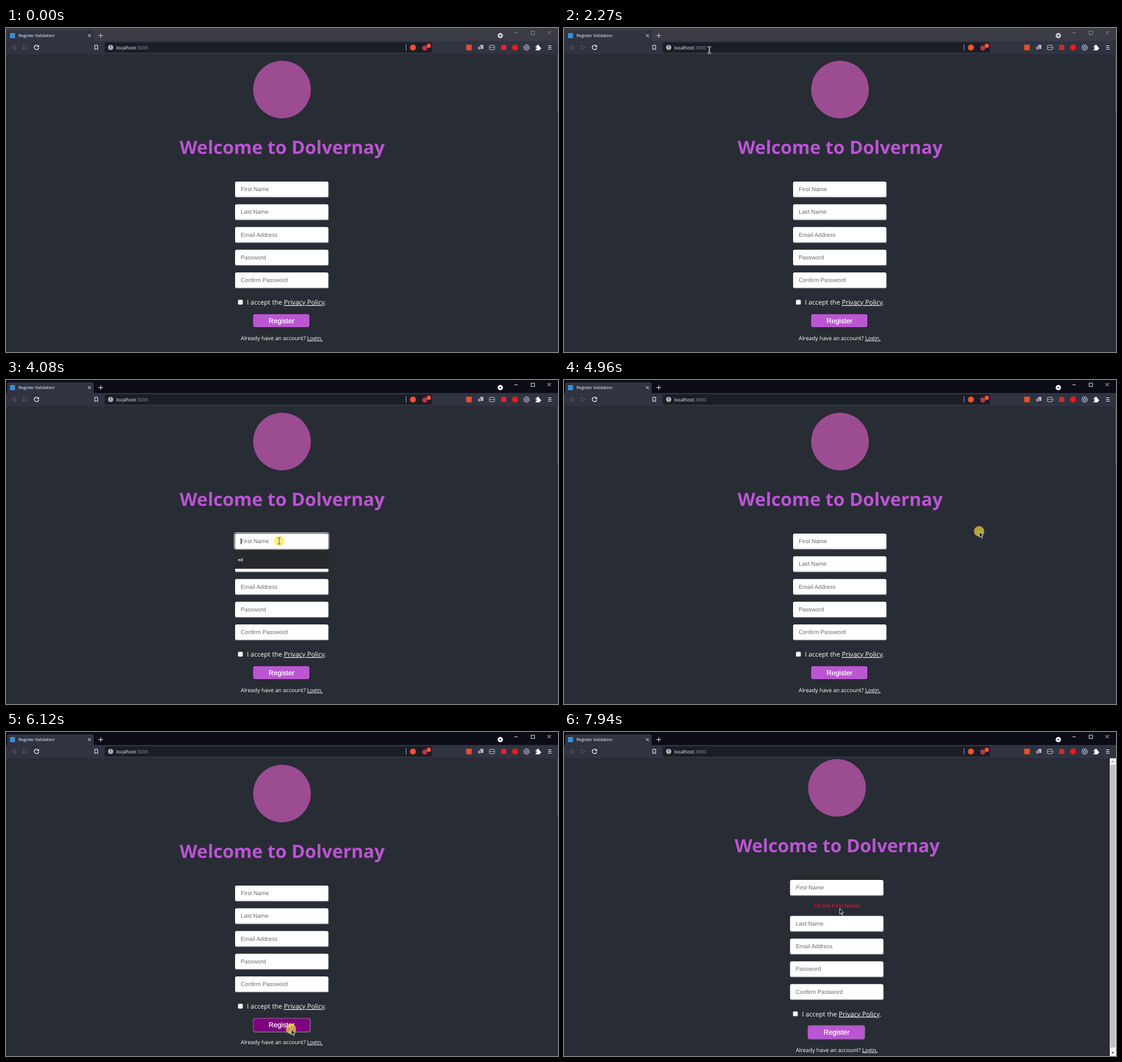
Animation of 976x574 px, one loop 8 s. Source, as an HTML page:

```html
<!DOCTYPE html>
<html lang="en">
<head>
<meta charset="utf-8">
<title>Register Validation</title>
<style>
html, body { margin: 0; width: 100%; height: 100%; overflow: hidden; background: #282c34; }
svg { display: block; width: 100%; height: 100%; }
text { font-family: "Open Sans", "Noto Sans", sans-serif; fill: #fff; text-rendering: geometricPrecision; white-space: pre; }
.arial { font-family: "Liberation Sans", Arial, sans-serif; }
.hint { font-size: 10.2px; fill: #6c6c6c; }
.medium { font-weight: 500; }
.line { fill: none; stroke: #fff; }
.dim { stroke: #62656f; }
.link { text-decoration: underline 1px; text-underline-offset: 1px; }
</style>
</head>
<body>
<svg viewBox="0 0 976 574">
  <rect width="976" height="574" fill="#282c34"/>
  <rect x="975" y="46" width="1" height="103" fill="#555960"/>

  <g id="upper">
    <circle cx="488" cy="109" r="51" fill="#9c4c91"/>
    <text x="307" y="223" font-size="32.3" font-weight="700" style="fill:#ba55d3">Welcome to Dolvernay</text>
    <rect id="focus" x="403.5" y="270.5" width="167.5" height="29.5" rx="3" fill="#15171b" stroke="#fff"/>
    <g id="firstField"></g>
    <path id="caret" d="M415.5 280V291" stroke="#111"/>
  </g>

  <text id="error" class="arial" x="441.3" y="311.3" font-size="10.1" style="fill:#e0163c">Fill the First Name</text>

  <g id="lower">
    <g id="fields"></g>
    <rect x="410.2" y="481.6" width="8.5" height="8.5" rx="1.5" fill="#fff" stroke="#767676" stroke-width=".4"/>
    <text x="426" y="490" font-size="11.6">I accept the <tspan class="link">Privacy Policy</tspan>.</text>
    <g id="button">
      <rect id="edge" x="436" y="506" width="101.7" height="25.2" rx="4"/>
      <rect id="face" x="436.7" y="506.7" width="100" height="23.5" rx="3.5"/>
    </g>
    <text class="arial" x="464.3" y="522.8" font-size="12.3" stroke="#fff" stroke-width=".25">Register</text>
    <text x="415" y="553" font-size="9.74">Already have an account? <tspan class="link">Login.</tspan></text>
  </g>

  <g id="list">
    <rect x="403.5" y="301.5" width="167.5" height="33" fill="#28292c"/>
    <text x="410" y="321" font-size="7.5" font-weight="600">ed</text>
  </g>

  <g id="scrollbar">
    <rect x="965" y="46" width="11" height="528" fill="#f1f1f1"/>
    <rect x="966" y="58" width="9" height="501" fill="#c1c1c1"/>
    <path d="M968 53.5l2.5-3 2.5 3z" fill="#a3a3a3"/>
    <path d="M968 567l2.5 3 2.5-3z" fill="#505050"/>
  </g>

  <!-- browser bars -->
  <rect id="titlebar" width="976" height="24"/>
  <path d="M2 24V7Q2 4 5 4H152Q155 4 155 7V24Z" fill="#2f3342"/>
  <rect y="23" width="976" height="23.5" fill="#2f3342"/>
  <rect x="7" y="9" width="9" height="9" fill="#3b8fd0"/>
  <text class="medium" x="22" y="16" font-size="7.4">Register Validation</text>
  <path class="line" d="M145 11l5 5m0-5l-5 5"/>
  <path id="newTab" class="line" d="M163.5 13.5h8m-4-4v8"/>
  <circle id="menu" cx="874" cy="13.5" r="4.7" fill="#fff"/>
  <path d="M871.8 12.4h4.4l-2.2 2.8z" fill="#15161f"/>
  <path id="controls" class="line" d="M899 8.5h6M928.5 5.5h6v6h-6zM957.5 5l6 6m0-6l-6 6" stroke-width=".9"/>

  <path class="line dim" d="M17 30.5v8l-6.5-4zM30.5 30.5v8l6.5-4z"/>
  <path class="line" d="M57 31.6A4 4 0 1 0 58 35" stroke-width="1.3"/>
  <path d="M58.3 30v3.8h-3.8z" fill="#fff"/>
  <path class="line" d="M157 30.5h5v8l-2.5-2-2.5 2z"/>

  <rect id="urlBar" x="174.5" y="25.5" width="578.5" height="18" rx="2.5" fill="#1b1d26"/>
  <circle cx="185" cy="34.5" r="4.6" fill="#b9bbc0"/>
  <path d="M185 31.5v3.6m0 1v1.4" stroke="#1b1d26" stroke-width="1.2"/>
  <rect id="selection" x="195" y="28.5" width="57.5" height="12.5" fill="#1668c8"/>
  <text class="medium" x="195" y="37.5" font-size="8.35">localhost<tspan id="port">:3000</tspan></text>
  <path d="M707.5 29v11" stroke="#a9abb2"/>
  <circle cx="719.5" cy="34.5" r="5.3" fill="#f5552f"/>
  <circle cx="740.5" cy="35.5" r="4.5" fill="#b53a45"/>
  <circle cx="747.5" cy="31.5" r="4" fill="#e8412c"/>
  <text x="746" y="34" font-size="6.5">1</text>

  <rect x="813.5" y="29.5" width="10" height="10" fill="#ec4b2b"/>
  <path d="M838 30h6v7h-6z" fill="#b9bbc1"/>
  <path d="M834.5 32.5h5v6h-5z" fill="#8d9099" stroke="#2f3342" stroke-width=".6"/>
  <g class="line" opacity=".75">
    <rect x="854.5" y="30.5" width="9.5" height="8" rx="2"/>
    <path d="M856 34.5h2.5m2 0h2" stroke-width="1.5"/>
  </g>
  <rect x="875.5" y="30" width="9" height="9" fill="#d9282f"/>
  <circle cx="900" cy="34.5" r="5.2" fill="#ee1c1c"/>
  <g class="line"><circle cx="920.5" cy="34.5" r="4.7"/><circle cx="920.5" cy="34.5" r="2"/></g>
  <path d="M936.5 32h2.5a1.7 1.7 0 1 1 3 0h2v2.5a1.6 1.6 0 1 1 0 3v2h-7.5v-2.5a1.5 1.5 0 1 0 0-2.8z" fill="#fff"/>
  <path class="line" d="M958.5 31.5h6m-6 3h6m-6 3h6"/>

  <circle id="press" r="9.2" fill="#ffe632" opacity=".65"/>
  <g id="pointer">
    <path id="arrow" d="M.5 .5V10.5L2.8 8.5 4.4 12.3 6 11.6 4.4 8H7.3Z" fill="#14151a" stroke="#fff" stroke-width=".8"/>
    <g id="beam" fill="none">
      <path d="M-3-5.5H3M0-5.5V5.5M-3 5.5H3" stroke="#fff" stroke-width="2.2"/>
      <path d="M-2.5-5.5H2.5M0-5.5V5.5M-2.5 5.5H2.5" stroke="#26282e" stroke-width=".9"/>
    </g>
  </g>
</svg>
<script>
const LOOP = 8000, ACTIVATE = 2340, FOCUS = 3960, BLUR = 4840, SUBMIT = 6250;
const PITCH = 40.25;

// pointer stops: time, x, y
const route = [
  [170, 780, 527], [560, 53, 139], [590, 53, 139],
  [860, 23, 13], [1060, 36, 13], [1260, 36, 13], [1340, 27, 1], [1800, 235, 43], [2000, 257, 39],
  [2660, 257, 39], [2740, 273, 54], [3340, 560, 226], [3540, 560, 226],
  [3880, 483, 285], [4620, 483, 285], [4780, 734, 268], [4970, 734, 268],
  [5160, 599, 375], [5370, 500, 488], [5440, 500, 488], [6000, 504, 526], [6450, 504, 526],
  [6650, 535, 455], [7000, 490, 299], [7200, 447, 306], [7260, 447, 306],
  [7460, 487, 323], [7939, 487, 323], [7940, 487, 312], [LOOP, 487, 312]
];
const presses = [[ACTIVATE, 2480], [FOCUS, 4140], [BLUR, 4970], [6060, SUBMIT]];

const el = id => document.getElementById(id);
const show = (id, on) => el(id).style.display = on ? "" : "none";
const set = (id, name, value) => el(id).setAttribute(name, value);
const move = (id, x, y) => set(id, "transform", `translate(${x} ${y})`);
const within = (t, a, b) => t >= a && t < b;
const inBox = ([x, y], l, t, r, b) => x >= l && x <= r && y >= t && y <= b;

function field(label, i) {
  const y = 272 + i * PITCH;
  const box = (dx, dy, w, h, fill) =>
    `<rect x="${405 + dx}" y="${y + dy}" width="${w}" height="${h}" rx="2.5" fill="${fill}"/>`;
  return box(-.8, -.8, 166, 28.5, "#1b1d21") + box(0, 1, 165.7, 27.5, "#77787c") + box(0, 0, 164.7, 27.2, "#fff") +
    `<text class="arial hint" x="415" y="${y + 17}">${label}</text>`;
}
const [first, ...others] = ["First Name", "Last Name", "Email Address", "Password", "Confirm Password"].map(field);
el("firstField").innerHTML = first;
el("fields").innerHTML = others.join("");

function pointerAt(t) {
  const i = route.findIndex(stop => stop[0] > t);
  if (i < 1) return [route[0][1], route[0][2]];
  const [t0, x0, y0] = route[i - 1], [t1, x1, y1] = route[i];
  const k = (t - t0) / (t1 - t0);
  return [x0 + (x1 - x0) * k, y0 + (y1 - y0) * k];
}

function overField(p, dx, dy, sent) {
  for (let i = 0; i < 5; i++) {
    const y = 272 + i * PITCH + (i ? dy : sent ? -10 : 0);
    if (inBox(p, 405 + dx, y, 570 + dx, y + 28)) return true;
  }
  return inBox(p, 190, 26, 704, 44);
}

function draw(t) {
  const active = t >= ACTIVATE, sent = t >= SUBMIT;
  const dx = sent ? -5.3 : 0, dy = sent ? 13.5 : 0;
  const p = pointerAt(t);

  set("titlebar", "fill", active ? "#0b0c15" : "#3b3c44");
  for (const id of ["newTab", "menu"]) set(id, "opacity", active ? 1 : .75);
  set("controls", "opacity", active ? 1 : .45);
  const editing = within(t, ACTIVATE, FOCUS);
  set("urlBar", "stroke", editing ? "#a8402f" : "none");
  show("selection", editing);
  el("port").style.fill = editing ? "#fff" : "#969aa5";

  move("upper", dx, sent ? -10 : 0);
  move("lower", dx, dy);
  const focused = within(t, FOCUS, BLUR);
  show("focus", focused);
  show("caret", focused);
  show("list", within(t, FOCUS + 60, BLUR));
  show("error", sent);
  show("scrollbar", sent);

  const hover = inBox(p, 436 + dx, 507 + dy, 537 + dx, 531 + dy);
  const down = within(t, ...presses[3]);
  set("face", "fill", hover ? "#800080" : "#ba55d3");
  set("edge", "fill", down ? "#96949a" : sent ? "#6a6a70" : "#0c0c10");
  move("button", down ? .8 : 0, down ? .8 : 0);

  show("press", presses.some(([a, b]) => within(t, a, b)));
  move("press", ...p);
  show("pointer", t >= 170 && !within(t, 590, 860));
  move("pointer", ...p);
  const typing = overField(p, dx, dy, sent);
  show("beam", typing);
  show("arrow", !typing);
}

let start;
function tick(now) {
  start ??= now;
  draw((now - start) % LOOP);
  requestAnimationFrame(tick);
}
draw(0);
requestAnimationFrame(tick);
</script>
</body>
</html>
```
